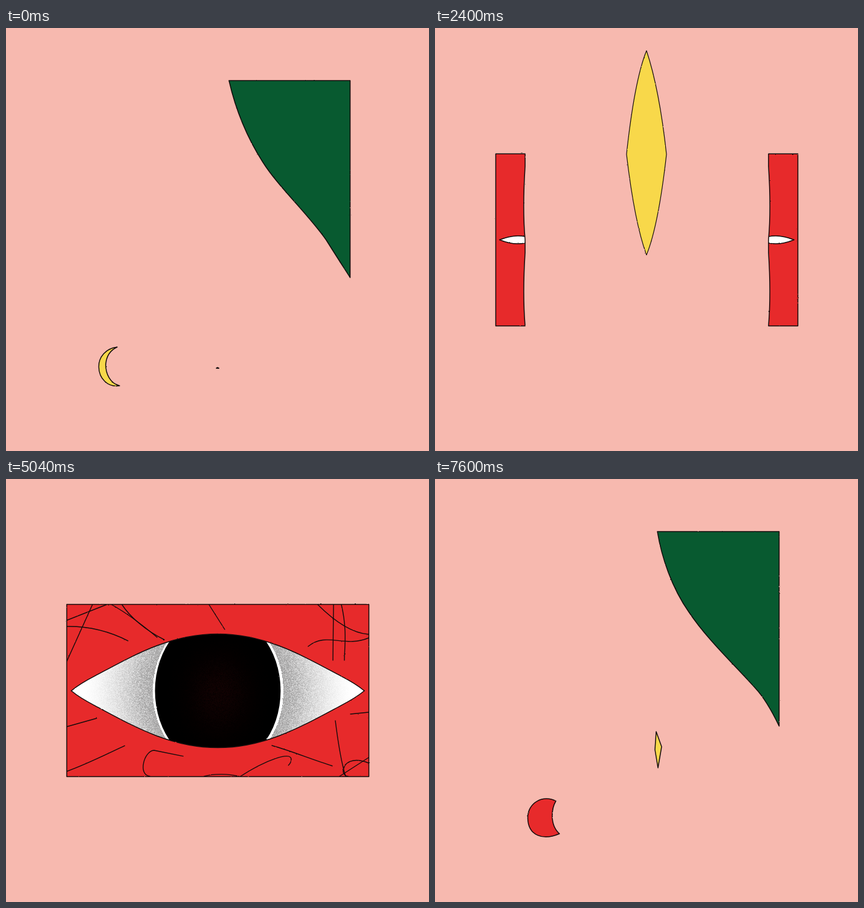
Recreate the animation shown at these times as an HTML page with a canvas. Size 700 by 700 pixels, loop 7.68 s.

```html
<!DOCTYPE html>
<html>
<head>
<meta charset="utf-8">
<style>
html, body { margin: 0; width: 100%; height: 100%; overflow: hidden; background: #f7b9af; }
canvas { display: block; filter: url(#rough); }
svg { position: absolute; width: 0; height: 0; }
</style>
</head>
<body>
<canvas id="stage" width="700" height="700"></canvas>
<svg>
  <filter id="rough" x="0" y="0" width="100%" height="100%" color-interpolation-filters="sRGB">
    <feTurbulence id="noise" type="fractalNoise" baseFrequency="0.35" numOctaves="1" seed="1"/>
    <feDisplacementMap in="SourceGraphic" scale="2" xChannelSelector="R" yChannelSelector="G"/>
  </filter>
</svg>
<script>
const STEP = 80, FRAMES = 96;
const ctx = document.getElementById('stage').getContext('2d');
const noise = document.getElementById('noise');
const C = { bg: '#f7b9af', ink: '#120b0b', green: '#085a30', red: '#e72a2b',
            yellow: '#f8d84a', blue: '#0a5bbf', pink: '#da628b' };
let T = 0;

// --- helpers ---
const NUM = /-?\d+(\.\d+)?/g;
const lerp = (a, b, k) => a + (b - a) * k;
function mix(a, b, k) {
  const to = b.match(NUM);
  let i = 0;
  return a.replace(NUM, v => lerp(+v, +to[i++], k).toFixed(2));
}
function flipY(s) {
  let i = 0;
  return s.replace(NUM, v => i++ % 2 ? 701 - v : v);
}
// Eased value from time, value pairs
function key(...a) {
  if (T <= a[0]) return a[1];
  for (let i = 2; i < a.length; i += 2) {
    if (T > a[i]) continue;
    const k = (T - a[i - 2]) / (a[i] - a[i - 2]);
    return lerp(a[i - 1], a[i + 1], k * k * (3 - 2 * k));
  }
  return a[a.length - 1];
}
function scaled(s, cx, cy, sx, sy = sx, dx = 0, dy = 0, turn = 0) {
  const p = new Path2D();
  p.addPath(new Path2D(s), new DOMMatrix().translate(cx + dx, cy + dy)
    .rotate(turn).scale(sx, sy).translate(-cx, -cy));
  return p;
}
function mirrored(s, sum = 701) {
  const p = new Path2D(s);
  p.addPath(new Path2D(s), new DOMMatrix([-1, 0, 0, 1, sum, 0]));
  return p;
}
function ink(p, width = 1.5) {
  ctx.lineWidth = width;
  ctx.strokeStyle = C.ink;
  ctx.stroke(p);
}
function paint(p, color, width) {
  ctx.fillStyle = color;
  ctx.fill(p);
  ink(p, width);
}
function clipped(p, rule, draw) {
  ctx.save();
  ctx.clip(p, rule);
  draw();
  ctx.restore();
}
// Speckle layer; shade(x, y) returns [rgb, strength], strength varies per pixel
function grain(x0, y0, w, h, shade) {
  const c = document.createElement('canvas');
  c.width = w; c.height = h;
  const g = c.getContext('2d');
  let seed = 7;
  const rnd = () => (seed = (seed * 16807) % 2147483647) / 2147483647;
  for (let y = 0; y < h; y++) for (let x = 0; x < w; x++) {
    const [rgb, strength] = shade(x + x0, y + y0);
    const alpha = Math.min(1, strength * (0.5 + rnd()));
    if (alpha < 0.01) continue;
    g.fillStyle = `rgba(${rgb},${alpha.toFixed(3)})`;
    g.fillRect(x, y, 1, 1);
  }
  return () => ctx.drawImage(c, x0, y0);
}

// --- shapes ---
const GREEN = {
  seed: 'M535 87 L569.5 87 L569.5 95 C569.5 92 569.5 90 569.5 88 C569.5 87 569 87 568 87 C560 87 550 87 535 87Z',
  grown: 'M368 87 L569.5 87 L569.5 409 C558 385 545 362 530 346 C495 307 450 265 420 220 C392 180 375 130 368 87Z',
  full: 'M369 87 L569.5 87 L569.5 413 C558 395 545 375 530 351 C500 308 450 262 425 222 C400 183 380 135 369 87Z',
  gone: 'M569 413 L569.5 413 L569.5 413 C569 413 569 413 569 413 C569 413 569 413 569 413 C569 413 569 413 569 413Z'
};
const MOON = {
  wide: 'M200 533 C180 522 153 535 153.5 561 C154 590 178 599 206 587 C198 580 194 570 194 557 C194 545 197 538 200 533Z',
  thin: 'M184 528 C165 530 153 545 153.5 561 C154 580 168 595 188 592 C172 588 165 572 165 557 C166 543 173 533 184 528Z',
  gone: 'M176 530 C162 534 153 545 153.5 561 C154 578 164 590 180 592 C164 588 154 578 153.5 561 C154 545 162 534 176 530Z'
};
const ROBE = 'M277 558 C292 535 297 475 302 440 C309 382 328 328 349 328 C373 329 391 365 397 410 C402 450 404 480 411 498 C419 517 430 535 440 554 C400 561 380 563 350 564 C320 563 295 561 277 558Z';
const SUN = 'M350 174 Q372.5 187 385 209 Q371 233 350 243 Q329 232 315 209 Q329 184 350 174Z';
const PANEL = [
  'M100.5 208 L104 208 L104 230 Q100 300 104 350 L104 372 Q100 440 104 493 L100.5 493Z',
  'M100.5 209 L351 209 L351 224 Q344 300 351 349 L351 372 Q345 440 351 493 L100.5 493Z'
];
const FULL_PANEL = new Path2D('M100.5 207.5 H600.5 V492.5 H100.5Z');
const LID = {
  shut: 'M102 350.5 C108 354 120 357 130 358 C200 369 270 381 350.5 383',
  open: 'M107 350.5 C125 358 145 360 163 351 C240 302 290 268 350.5 268',
  wide: 'M109 350.5 C109 332 118 314 135 305 C185 285 255 247 350.5 247'
};
const CREASE = 'M109 350 C112 328 130 305 150 298 C170 293 190 298 212 286 C235 266 285 247 350.5 247';
const SCRIBBLE = [
  'M100 234 L166 208', 'M143 208 L100 303', 'M100 244 C150 243 190 260 215 275',
  'M175 208 C200 222 230 245 250 262', 'M192 208 C205 228 230 250 262 266', 'M336 208 L362 249',
  'M515 207 C540 232 570 255 600 257', 'M542 208 L541 300', 'M555 208 C565 250 560 280 560 300',
  'M500 277 C530 252 560 280 600 263', 'M100 410 L150 396', 'M100 484 C140 470 180 448 222 430',
  'M238 492 C218 490 228 450 245 449 C300 460 350 470 412 485',
  'M388 492 C430 465 472 450 472 464 C470 490 422 470 420 492',
  'M328 492 C345 487 370 488 385 492', 'M440 441 C490 455 540 480 600 489',
  'M545 400 C550 440 555 470 562 492', 'M552 492 L600 461',
  'M600 470 C575 460 558 468 558 485 C560 490 563 492 566 492', 'M570 389 L600 386'
].map(s => new Path2D(s));
const TRIANGLE = 'M201 172 L298 340.5 L104 340.5Z';
const HEART_PETAL = 'M201 199 C199 240 170 255 165 285 C163 310 180 325 201 340 C222 325 239 310 237 285 C232 255 203 240 201 199Z';
const SIDE_PETALS = [
  'M149 263 C185 270 203 290 205 315 Q205 330 201 340 C150 345 135 330 125 304 L90 304Z',
  'M119 317 C150 297 185 305 201 340 L104 340 L90 330Z'
];
const FLOWER = 'M560 556 C566 553 568 560 570 560 C575 553 583 556 581 566 C580 575 586 582 586 587 C578 584 565 583 558 582 C552 578 558 572 557 569 C553 566 553 559 560 556Z M586 587 L597 598';
const GEM = ['M371 438 L380 449.5 L371 461 L362 449.5Z', 'M366 418 L375 443 L369 478 L364 448Z'];

const robeGrain = grain(225, 320, 250, 250, (x, y) =>
  ['5,14,34', 0.05 + 0.8 * Math.max(0, (y - 400) / 160) ** 3]);
const eyeGrain = grain(105, 243, 492, 216, (x, y) => {
  const edge = 108 * Math.sqrt(1 - ((y - 350.5) / 130) ** 2);
  const d = (Math.abs(x - 350.5) - edge) / 120;
  if (d > 0) return ['8,6,6', 0.95 * Math.max(0, 1 - d) ** 1.6];
  return ['110,16,18', 0.35 * Math.exp(-(((x - 352) / 48) ** 2) - ((y - 355) / 60) ** 2)];
});

// --- parts ---
function green() {
  let s;
  if (T < 1040) s = mix(GREEN.full, GREEN.gone, key(0, 0, 1040, 1));
  else if (T >= 6560) s = mix(GREEN.seed, GREEN.grown, key(6640, 0, 7600, 1));
  if (s) paint(new Path2D(s), C.green);
}

function moon() {
  if (T < 240) paint(new Path2D(mix(MOON.thin, MOON.gone, T / 240)), C.yellow);
  else if (T >= 7520) paint(new Path2D(MOON.wide), C.red);
}

function robe() {
  if (T >= 2400) return;
  const p = scaled(ROBE, 350, 563,
    key(0, 0.025, 600, 0.9, 1200, 1.5, 1600, 1, 2400, 0),
    key(0, 0.004, 800, 0.3, 1200, 0.6, 1600, 1));
  paint(p, C.blue);
  clipped(p, 'nonzero', robeGrain);
  ink(p, 1.2);
}

function sun() {
  if (T <= 1000 || T >= 2640) return;
  paint(scaled(SUN, 350, 209,
    key(1000, 0, 1600, 1, 2080, 2.4, 2640, 0),
    key(1000, 0, 1600, 1, 2320, 4.9)), C.yellow, 1.2);
}

function eye() {
  const open = key(3600, 1, 4080, 0, 4320, 0, 4800, 1);
  const wide = key(3040, 0, 3440, 0.6, 3840, 0, 4400, 0, 5600, 1);
  const shade = key(4640, 0, 5600, 1);
  const lid = base => mix(mix(LID.shut, base(LID.open), open), base(LID.wide), wide);
  const top = lid(s => s), bottom = lid(flipY);
  const shape = mirrored(`${top} L350.5 350.5Z ${bottom} L350.5 350.5Z`);
  clipped(shape, 'evenodd', () => {
    ctx.fillStyle = '#fff';
    ctx.fillRect(100, 200, 501, 300);
    ctx.fillStyle = '#000';
    ctx.beginPath();
    ctx.ellipse(350.5, 350.5, lerp(99, 108, wide), lerp(125, 130, wide), 0, 0, 7);
    ctx.fill();
    ctx.globalAlpha = shade;
    eyeGrain();
    ink(mirrored(CREASE), 1);
    ink(mirrored(flipY(CREASE)), 1);
  });
  ink(mirrored(top));
  ink(mirrored(bottom));
}

function panel(p) {
  clipped(p, 'nonzero', () => {
    ctx.fillStyle = C.red;
    ctx.fillRect(90, 200, 520, 300);
    const drawn = key(4640, 0, 5680, 1);
    if (drawn) {
      ctx.setLineDash([320 * drawn, 400]);
      SCRIBBLE.forEach(s => ink(s, 1.4));
      ctx.setLineDash([]);
    }
    eye();
  });
  ink(p);
}

function panels() {
  if (T < 2160 || T > 5680) return;
  if (T > 3040) return panel(FULL_PANEL);
  const s = mix(...PANEL, key(2160, 0, 3040, 1));
  panel(new Path2D(s));
  panel(scaled(s, 350.5, 0, -1, 1));
}

// The panel turns into the flower, the eye white into the triangle
function scatter() {
  if (T <= 5680 || T >= 6240) return;
  const k = key(5680, 0, 6160, 1), p = new Path2D(), white = new Path2D();
  p.rect(lerp(100, 556, k), lerp(208, 558, k), lerp(500, 26, k), lerp(285, 26, k));
  paint(p, C.red);
  if (k === 1) return;
  white.ellipse(lerp(350, 201, k), lerp(350, 300, k), 241 * (1 - k), 103 * (1 - k), 0, 0, 7);
  paint(white, '#fff');
}

function lotus() {
  const size = key(5920, 0, 6480, 1, 6880, 1, 7440, 0);
  if (!size) return;
  const move = new DOMMatrix().translate(201, 340).scale(size).translate(-201, -340);
  const tri = scaled(TRIANGLE, 201, 340, size);
  const petals = scaled(HEART_PETAL, 201, 340, size);
  SIDE_PETALS.forEach(s => petals.addPath(mirrored(s, 402), move));
  const all = new Path2D(petals);
  all.addPath(tri);
  clipped(tri, 'nonzero', () => {
    ctx.fillStyle = C.pink;
    ctx.fill(all, 'evenodd');
    ink(petals, 1.4);
  });
  ink(tri, 1.4);
}

function card() {
  if (T <= 5680) return;
  const k = key(5680, 0, 6320, 1), turn = key(6720, 1, 7440, 0);
  if (turn) {
    const w = lerp(215, 97, k) * turn, h = lerp(206, 161, k), p = new Path2D();
    p.roundRect(lerp(350.5, 370.5, k) - w / 2, lerp(248, 367.5, k), w, h, Math.min(100 * (1 - k), w / 2));
    paint(p, '#000');
  }
  const size = key(6320, 0, 6640, 1);
  if (size) paint(scaled(mix(...GEM, key(6960, 0, 7600, 1)), 371, 449.5, size),
    T < 7360 ? C.blue : C.yellow);
}

function flower() {
  if (T < 6240 || T >= 7520) return;
  paint(scaled(FLOWER, 570, 570,
    key(6240, 0.6, 6640, 1, 7440, 1.7), undefined,
    key(6640, 0, 6800, 14, 7440, -380),
    key(6640, 0, 6800, 14, 7200, 26, 7520, -8),
    key(6800, 0, 7440, 120)), C.red);
}

let last = -1;
function frame(now) {
  const n = Math.floor(now / STEP) % FRAMES;
  if (n !== last) {
    last = n;
    T = n * STEP;
    noise.setAttribute('seed', 1 + n % 4);
    ctx.fillStyle = C.bg;
    ctx.fillRect(0, 0, 700, 700);
    ctx.lineJoin = ctx.lineCap = 'round';
    [green, moon, robe, sun, panels, scatter, lotus, card, flower].forEach(draw => draw());
  }
  requestAnimationFrame(() => frame(performance.now() - start));
}
const start = performance.now();
frame(0);
</script>
</body>
</html>
```
